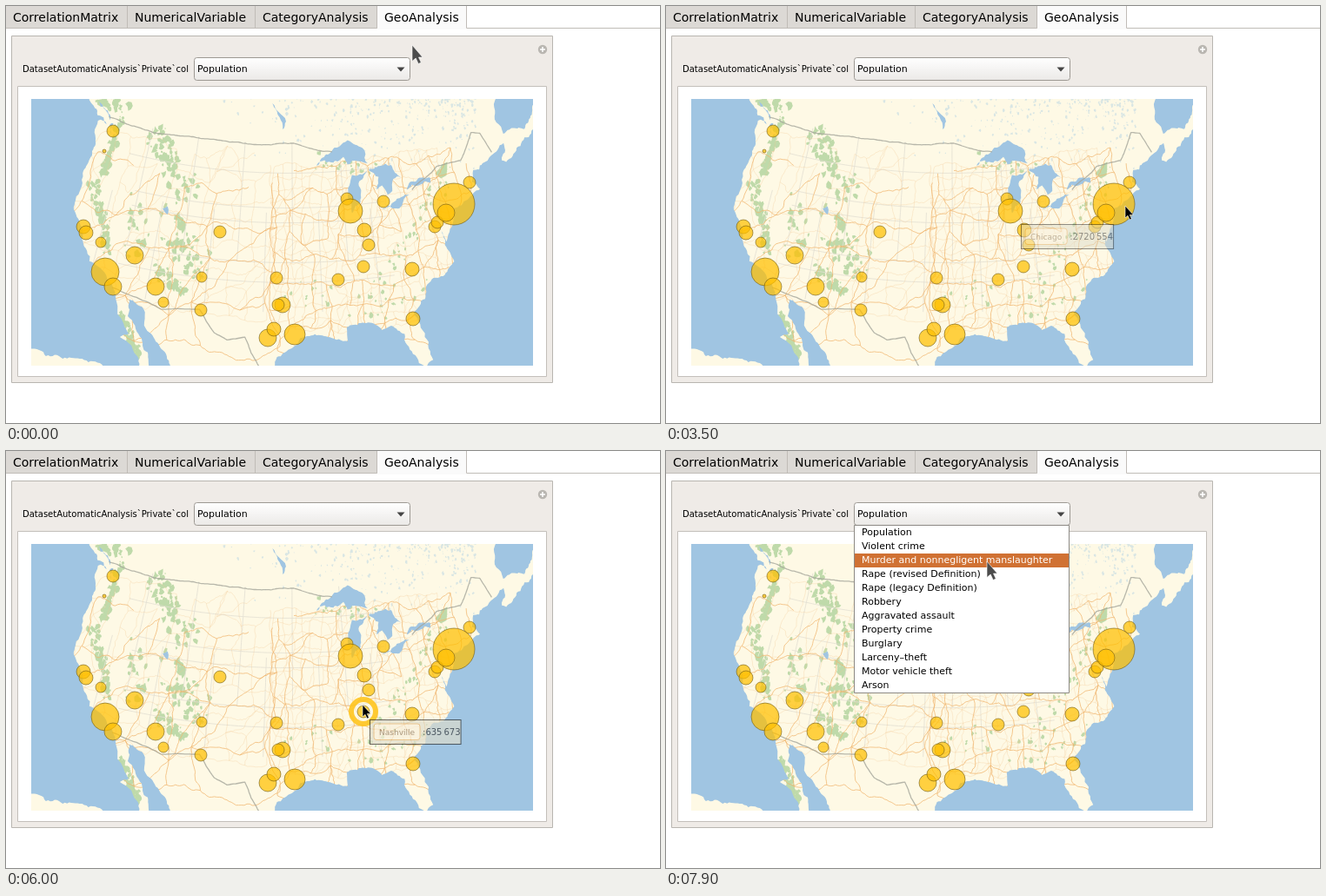
Write an HTML page that moves like this. It is 752 by 480 pixels and loops after 8 s.

```html
<!DOCTYPE html>
<html>
<head>
<meta charset="utf-8">
<style>
html, body { margin: 0; width: 100%; height: 100%; overflow: hidden; background: #fff }
svg { display: block; width: 752px; height: 480px; font: 11px "DejaVu Sans", sans-serif }
.tabs { font-size: 14px }
.map path { fill: none; stroke-linejoin: round }
.tip { font-size: 10px }
</style>
</head>
<body>
<svg viewBox="0 0 752 480">
  <defs><clipPath id="frame"><path d="M29 107H606V414H29Z"/></clipPath>
    <linearGradient id="face" x2="0" y2="1"><stop stop-color="#fff"/><stop offset="1" stop-color="#ebe9e7"/></linearGradient>
    <linearGradient id="lit" x2="0" y2="1"><stop stop-color="#fff"/><stop offset="1" stop-color="#f5f4f3"/></linearGradient></defs>
  <path d="M0 0H427V26H0Z" fill="#dcd9d5"/>
  <path d="M427 0H529V27H427Z" fill="#fafafa"/>
  <path d="M139.5 0V26M286.5 0V26M0 25.5H426.5V0M529.5 0V25.5H752" fill="none" stroke="#c0bcb7"/>
  <g class="tabs"><text x="8" y="18">CorrelationMatrix</text><text x="148" y="18">NumericalVariable</text><text x="295" y="18">CategoryAnalysis</text><text x="435" y="18">GeoAnalysis</text></g>
  <path d="M6.5 34.5H628.5V433.5H6.5Z" fill="#efebe7" stroke="#b8b5b0"/>
  <path d="M13.5 92.5H621.5V426.5H13.5Z" fill="#fff" stroke="#c3bfba"/>
  <circle cx="617" cy="50" r="5.2" fill="#b9b6b1"/><path d="M614 50H620M617 47V53" stroke="#fff" stroke-width="1.5"/>
  <text x="19" y="76" font-size="10">DatasetAutomaticAnalysis`Private`col</text>
  <rect id="combo" x="216.5" y="59.5" width="248" height="26" rx="3" stroke="#9d9993"/>
  <text x="220" y="76">Population</text><path d="M449.5 70.5H458.5L454 75.5Z" fill="#444"/>
  <g class="map" clip-path="url(#frame)"><path d="M29 107H606V414H29Z" style="fill:#fef9e5"/><g id="map"></g></g>
  <g id="dots" fill="#ffbf00" fill-opacity=".72" stroke="#6e5a14" stroke-opacity=".75" stroke-width=".8"></g>
  <circle id="ring" fill="none" stroke="#ffc41a" stroke-width="6" opacity=".88"/>
  <g id="tips"></g>
  <g id="menu"><path d="M216.5 85.5H463.5V278.5H216.5Z" fill="#fff" stroke="#8c8984"/><rect id="bar" x="217" width="246" height="16" fill="#d07133"/></g>
  <path id="cursor" stroke="#fff" stroke-width=".6"/>
</svg>
<script>
const $ = id => document.getElementById(id);
const set = (el, attrs) => { for (const k in attrs) el.setAttribute(k, attrs[k]); return el; };
const add = (parent, tag, attrs, text = '') => {
  const el = set(document.createElementNS('http://www.w3.org/2000/svg', tag), attrs);
  el.textContent = text;
  return parent.appendChild(el);
};
let seed = 11;
const rnd = () => (seed = (seed * 16807) % 2147483647) / 2147483647;
const spread = () => rnd() + rnd() - 1;
const nums = s => s.split(' ').map(Number);

// Conic projection of degrees west and north.
const proj = ([w, n]) => {
  const a = (96 - w) * .01075, r = 840 + (38 - n) * 11.45;
  return [325 + r * Math.sin(a), r * Math.cos(a) - 556];
};
const pt = p => p.map(v => v.toFixed(1)).join(' ');

// Splits a segment until it is short, pushing the middle sideways.
function split(a, b, amp, out) {
  const dx = b[0] - a[0], dy = b[1] - a[1];
  if (Math.hypot(dx, dy) < .4) return out.push(b);
  const k = spread() * amp;
  const m = [(a[0] + b[0]) / 2 - dy * k, (a[1] + b[1]) / 2 + dx * k];
  split(a, m, amp, out);
  split(m, b, amp, out);
}
function trace(points, amp) {
  const out = [points[0]];
  points.slice(1).forEach((p, i) => split(points[i], p, amp, out));
  return 'M' + out.map(q => pt(proj(q))).join('L');
}
const pairs = s => s.split(',').map(nums);
const shape = s => { const p = pairs(s); return trace([...p, p[0]], .22) + 'Z'; };
const layer = (d, style) => add($('map'), 'path', { d, style });

function blob(x, y, r) {
  let d = '';
  for (let a = 0; a < 6; a += .9) {
    const q = r * (.45 + rnd() * .9);
    d += (a ? 'L' : 'M') + pt([x + q * Math.cos(a) * .8, y + q * Math.sin(a)]);
  }
  return d + 'Z';
}

// Forests scattered along ranges: from, to, spread, count
let woods = '';
for (const row of [
  '121.2 49 122 43 .7 50', '123 42.5 118.5 36 .9 60', '116 48.5 110 43.5 2 75', '111.5 40 107 36 2.2 65', '112.5 35.5 108 33 .9 35',
  '127 51 121 50 1 30', '117 41 115 36 1.8 18', '115.3 30 112.6 26.2 .5 70', '85 34.5 74 44 1.2 50', '92 47 84 46 1.2 22', '95 34 80 32 2.5 40'
]) {
  const [w0, n0, w1, n1, s, count] = nums(row);
  for (let i = 0; i < count; i++) {
    const k = rnd(), p = [w0 + (w1 - w0) * k + spread() * s, n0 + (n1 - n0) * k + spread() * s];
    woods += blob(...proj(p), 1 + rnd() * (w0 > 100 ? 4 : 2));
  }
}
layer(woods + blob(502, 188, 9), 'fill:#bfdaaa');

let ponds = '';
for (let i = 0; i < 330; i++) ponds += blob(240 + 300 * Math.sqrt(rnd()), 104 + rnd() * rnd() * 90, .5 + rnd() * 1.6);
layer(ponds, 'fill:#d9e6e4');

// Borders of states: parallels and meridians
let states = '';
for (const n of [35, 37, 41, 42.5, 46]) states += trace([[n > 45 ? 119 : 117, n], [83, n]], 0);
for (let w = 120, i = 0; w > 82; w -= 3.5, i++) states += trace([[w, i % 2 ? 49 : 42], [w, i % 2 ? 37 : 32]], 0);
layer(states, 'stroke:#e2dfd2;stroke-width:.8');

// Roads join the neighbours of a jittered grid.
function roads(west, east, south, north, step) {
  const node = {}, key = (i, j) => i + ',' + j;
  let d = '';
  for (let i = 0; west - i * step > east; i++) for (let j = 0; south + j * step < north; j++) {
    const p = node[key(i, j)] = [west - (i + spread() * .45) * step, south + (j + spread() * .45) * step];
    for (const q of [node[key(i - 1, j)], node[key(i, j - 1)], rnd() < .25 && node[key(i - 1, j - 1)]])
      if (q && rnd() < .85) d += trace([q, p], .18);
  }
  return d;
}
layer(roads(124, 97, 31.5, 49, 2.3) + roads(98, 74, 30, 47, 1.3), 'stroke:#f1c78f;stroke-width:.6;opacity:.5');
layer(roads(123, 97, 28, 49, 4.2) + roads(98, 70, 28, 46.5, 2.3), 'stroke:#f0b66f;stroke-width:1;opacity:.75');

// Key points of the waters, in degrees west and north
const seas = [
  '135 53,128 50.8,125 48.8,123.3 48.2,124.7 48.3,124 46,124.5 42.8,124.1 41.5,124.4 40.4,122.5 37.6,120.6 35,120.5 34.5,118.4 33.8,117.2 32.8,115.8 30,114.1 28.3,115 27.8,112.5 26,112 22,140 22',
  '114.8 31.7,114.6 30,112.8 28.2,111.2 25,108 23,109.2 26.3,112.1 28.9,113.2 31.2',
  '97.7 22,97.2 25.5,97.3 27.5,94.7 29.4,91.3 29.4,89.3 28.9,89.3 30.3,86 30.3,85.3 29.7,84.2 30,82.8 29,82.7 27.9,81.7 25.9,80 22',
  '81 22,81 25.2,80.1 26,80.6 28.4,81.4 31,78.8 33.8,75.5 35.3,76.2 37.1,76.4 39.1,75.9 37.4,75.1 38.6,74.1 39.8,74 40.5,72 41,71 41.5,70 41.7,70.8 42.6,70.2 43.7,67.2 44.6,65 45.4,66 43.8,65.5 43.5,63.5 44.5,59.5 46.3,50 46,55 22',
  '64.6 46.3,61.5 46,60 47,58 50,64 49.8,64.6 48.8,65 47.6',
  '92 46.7,89.2 48.4,86.5 48.7,84.8 47.8,84.6 46.5,87.5 46.6,88 47.4,89.5 46.9',
  '87.5 41.7,87.9 43.3,87.5 44.5,87 45.5,84.8 45.8,86.2 44.6,86.2 42.7',
  '84.6 45.8,83.3 45,83.8 43.8,83 44.1,82.4 43.1,81.7 43.4,81.3 44.6,80.2 44.6,81.3 46',
  '83.4 41.8,81.5 41.6,78.9 42.9,82 42.2', '79.7 43.3,76.3 43.5,76.2 44,79.4 43.7',
  '96.9 50.4,96.4 51.2,98.6 53,97.4 51.6', '112.9 41.3,112.1 40.8,112.3 41.6', '122.4 48.5,122.3 47.3,122.9 48.2', '123 48.7,125.5 50.2,123.2 49.2'
];
layer(seas.map(shape).join(''), 'fill:#a0c5e2');

const borders = [
  '123.3 49,95.2 49,92 48.3,89.6 48', '79 43.2,75 45,71.5 45,69 47.4,67.8 47.1,67 44.9',
  '117.1 32.5,111 31.3,106.5 31.8,104.5 29.6,103 29,101 29.4,99.2 26.4,97.2 25.9'
];
layer(borders.map(s => trace(pairs(s), .04)).join(''), 'stroke:#a5a79c;stroke-width:1.3;opacity:.8');

// City markers: x, y and a radius where it is not 7
const dots = '123 144,113 167 2,89 254 8,92 261 8,109 272 6,148 287 10,114 306 16,123 323 10,172 323 10,181 341 6,225 312 6,224 350,246 260,311 313,318 344 9,313 344,301 382 10,308 372 8,332 378 12,382 315,417 275,412 258 8,392 222,434 225,467 303 8,468 360 8,493 254,533 203';
const named = { 'Chicago': '396 236 14', 'New York City': '515 228 24', 'Baltimore': '496 249', 'Philadelphia': '506 238 10', 'Nashville': '411 300' };
for (const c of [...dots.split(','), ...Object.values(named)]) {
  const [cx, cy, r = 7] = nums(c);
  add($('dots'), 'circle', { cx, cy, r });
}

['Population', 'Violent crime', 'Murder and nonnegligent manslaughter', 'Rape (revised Definition)', 'Rape (legacy Definition)', 'Robbery',
  'Aggravated assault', 'Property crime', 'Burglary', 'Larceny–theft', 'Motor vehicle theft', 'Arson']
  .forEach((s, i) => add($('menu'), 'text', { x: 225, y: 97 + i * 16 }, s));
const items = $('menu').querySelectorAll('text');

// Where the pointer rests: arrival, departure, x, y
const stops = pairs('0 0 467 45,400 400 474 34,900 1000 455 72,1100 1700 448 71,2500 2500 400 234,2800 3200 404 241,3500 4000 528 230,4400 5000 494 249,5900 6300 410 292,6800 6800 398 96,7000 7500 397 72,7900 8000 369 127');
function pointer(t) {
  const i = stops.findLastIndex(s => s[0] <= t), [, leave, x, y] = stops[i];
  if (t <= leave) return [x, y];
  const [arrive, , x1, y1] = stops[i + 1], k = (t - leave) / (arrive - leave), e = k * k * (3 - 2 * k);
  return [x + (x1 - x) * e, y + (y1 - y) * e];
}

function tooltip(name, count, at) {
  const [x, y] = pointer(at), g = add($('tips'), 'g', { class: 'tip', transform: `translate(${x + 8} ${y + 17})` });
  const box = add(g, 'rect', { x: .5, y: .5, height: 28, fill: '#dedccb', stroke: '#222' });
  const tag = add(g, 'rect', { x: 5, y: 5, height: 18.5, rx: 3, fill: '#f7efdc', stroke: '#dfaa62' });
  const label = add(g, 'text', { x: 11, y: 18, fill: '#80684c', 'font-size': 9, 'word-spacing': 1 }, name);
  const w = label.getComputedTextLength() + 12, [a, b] = count.split(' ');
  const num = add(g, 'text', { x: w + 8, y: 18, fill: '#222' }, ':' + a);
  add(num, 'tspan', { dx: 2 }, b);
  set(tag, { width: w });
  set(box, { width: w + num.getComputedTextLength() + 10 });
  return g;
}

// Hovered cities: ring start and end, tooltip end
const visits = [
  ['Chicago', '2720 554', 2500, 3400, 3650], ['New York City', '8396 126', 3600, 4200, 4600],
  ['Philadelphia', '', 4200, 4500], ['Baltimore', '623 513', 4500, 5200, 5400], ['Nashville', '635 673', 5900, 6500, 7000]
].map(([name, count, from, to, fade]) => ({ from, to, fade, spot: nums(named[name]), tip: count && tooltip(name, count, from) }));

const bigArrow = 'M0 0V18.5L4.2 15 7.2 21.5 10.3 20 7.5 14H12Z';
const smallArrow = 'M0 0V14L3 11.3 5.2 16 7.4 15 5.3 10.5H9.5Z';

function draw(now) {
  const t = Math.floor(now % 8000 / 100) * 100;
  const [x, y] = pointer(t), open = t >= 7600, onMap = y > 107 && !open;
  set($('cursor'), { transform: `translate(${x} ${y})`, d: onMap ? smallArrow : bigArrow, fill: onMap ? '#000' : '#4c4c4c' });
  set($('combo'), { fill: `url(#${y > 59 && y < 86 && x < 465 ? 'lit' : 'face'})` });

  const hit = visits.find(v => t >= v.from && t < v.to);
  $('ring').style.display = hit ? '' : 'none';
  if (hit) {
    const [cx, cy, r = 7] = hit.spot;
    set($('ring'), { cx, cy, r: r + 7 });
  }
  for (const { from, fade, tip } of visits)
    if (tip) tip.style.opacity = Math.max(0, Math.min(1, (t - from + 100) / 300, (fade - t) / 300));

  $('menu').style.display = open ? '' : 'none';
  const row = Math.max(0, Math.floor((y - 86) / 16));
  set($('bar'), { y: 86 + row * 16 });
  items.forEach((el, j) => set(el, { fill: j == row ? '#fff' : '#000' }));
  requestAnimationFrame(draw);
}
draw(0);
</script>
</body>
</html>
```
